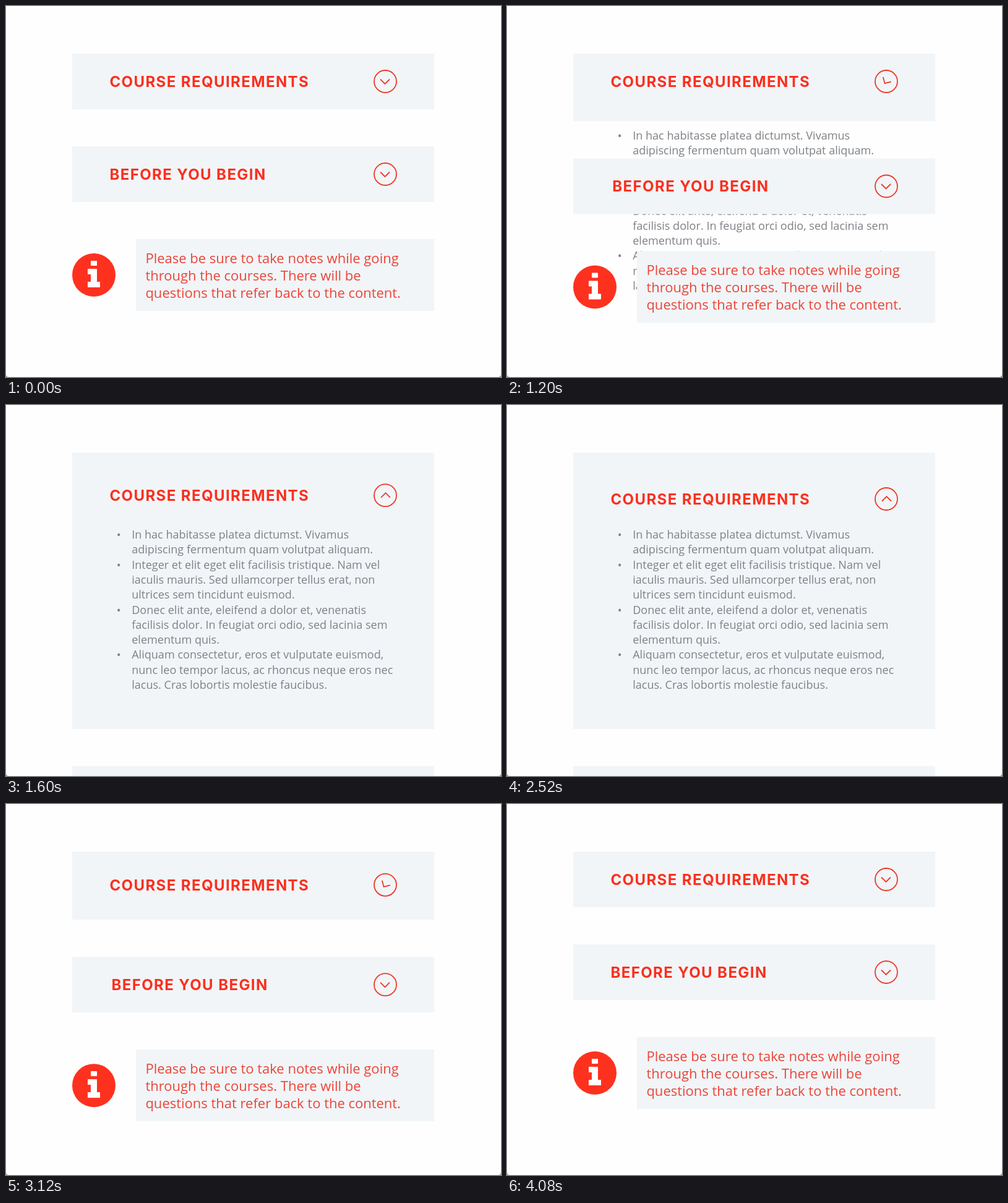
These frames come from a looping animation (800 px wide and 600 px high, 4100 ms). An HTML page:

```html
<!DOCTYPE html>
<html lang="en">
<head>
<meta charset="utf-8">
<title>Accordion</title>
<style>
  html, body { margin: 0; width: 100%; height: 100%; overflow: hidden; background: #fefefe; }
  svg { display: block; width: 100vw; height: 100vh; }
  .panel { fill: #f1f5f8; }
  .title { font: 700 24px Inter, Roboto, sans-serif; letter-spacing: 1.4px; fill: #fb2f1e; }
  .list { font: 400 18.06px "Open Sans", "Noto Sans", sans-serif; fill: #7f8186; }
  .note { font: 400 22px "Open Sans", "Noto Sans", sans-serif; fill: #ec4437; }
  .line { fill: none; stroke: #f0382a; stroke-width: 1.8; }
</style>
</head>
<body>
<svg viewBox="0 0 800 600">
  <defs>
    <path id="chevron" class="line" d="M-8 -3.5L-.5 4L7 -3.5"/>
    <circle id="ring" class="line" r="18"/>
  </defs>

  <rect id="body" class="panel" x="107" y="77" width="585" height="90"/>
  <g id="list" class="list"></g>
  <g id="head">
    <text class="title" x="167.4" y="131">COURSE REQUIREMENTS</text>
    <g transform="translate(613 122)">
      <use href="#ring"/>
      <use id="arrow" href="#chevron"/>
    </g>
  </g>

  <g id="lower">
    <rect class="panel" x="107" y="227" width="585" height="90"/>
    <text id="second" class="title" y="281">BEFORE YOU BEGIN</text>
    <g transform="translate(613 272)">
      <use href="#ring"/>
      <use href="#chevron"/>
    </g>
    <circle cx="142" cy="435" r="35" fill="#fe311f"/>
    <g fill="#fff" stroke="#fff" stroke-linejoin="round">
      <path d="M137.500 412.500h9v7h-9z"/>
      <path d="M132.500 425.500h14v21h5v8h-19v-8h5v-13h-5z"/>
    </g>
    <rect class="panel" x="210" y="377" width="482" height="116"/>
    <g id="note" class="note"></g>
  </g>

  <path d="M0 595Q0 600 5 600H0zM800 595Q800 600 795 600H800z" fill="#a0a0a0"/>
</svg>
<script>
  const LOOP = 4100, OPEN_AT = 1144, CLOSE_AT = 2777;
  const TRAVEL = 357, HEAD_DROP = 30, TITLE_X = 167.4, TITLE_SHIFT = 54, SPIN = 540;

  const items = [
    ["In hac habitasse platea dictumst. Vivamus",
     "adipiscing fermentum quam volutpat aliquam."],
    ["Integer et elit eget elit facilisis tristique. Nam vel",
     "iaculis mauris. Sed ullamcorper tellus erat, non",
     "ultrices sem tincidunt euismod."],
    ["Donec elit ante, eleifend a dolor et, venenatis",
     "facilisis dolor. In feugiat orci odio, sed lacinia sem",
     "elementum quis."],
    ["Aliquam consectetur, eros et vulputate euismod,",
     "nunc leo tempor lacus, ac rhoncus neque eros nec",
     "lacus. Cras lobortis molestie faucibus."]
  ];
  const noteLines = [
    "Please be sure to take notes while going",
    "through the courses. There will be",
    "questions that refer back to the content."
  ];

  const el = id => document.getElementById(id);
  const [body, list, head, arrow, lower, second, note] =
    ["body", "list", "head", "arrow", "lower", "second", "note"].map(el);

  function addText(parent, x, y, string) {
    const text = document.createElementNS("http://www.w3.org/2000/svg", "text");
    text.setAttribute("x", x);
    text.setAttribute("y", y);
    text.textContent = string;
    parent.append(text);
  }

  let row = 0;
  for (const lines of items) {
    lines.forEach((line, i) => {
      const y = 216 + 24.3 * row++;
      if (i === 0) addText(list, 178.8, y, "•");
      addText(list, 203.2, y, line);
    });
  }
  noteLines.forEach((line, i) => addText(note, 225.4, 416 + 28 * i, line));

  const span = (t, start, length) => Math.min(1, Math.max(0, (t - start) / length));
  const smooth = u => u * u * (3 - 2 * u);

  const slide = t => smooth(span(t, 0, 402));
  // The heading follows late: a quick move, then a long settle.
  const follow = t =>
    0.7 * smooth(span(t, 110, 240)) + 0.3 * (1 - (1 - span(t, 335, 710)) ** 2.3);

  function draw(t) {
    const closing = t >= CLOSE_AT;
    const local = t - (closing ? CLOSE_AT : OPEN_AT);
    const amount = ease => closing ? 1 - ease(local) : ease(local);
    const open = amount(slide);

    body.setAttribute("height", 90 + TRAVEL * open);
    list.setAttribute("visibility", t >= OPEN_AT && !closing ? "visible" : "hidden");
    head.setAttribute("transform", `translate(0 ${HEAD_DROP * amount(follow)})`);
    arrow.setAttribute("transform", `rotate(${SPIN * open})`);
    lower.setAttribute("transform", `translate(0 ${TRAVEL * open})`);
    second.setAttribute("x", TITLE_X + TITLE_SHIFT * open);
  }

  const start = performance.now();

  function tick() {
    draw((performance.now() - start) % LOOP);
    requestAnimationFrame(tick);
  }

  tick();
</script>
</body>
</html>
```
